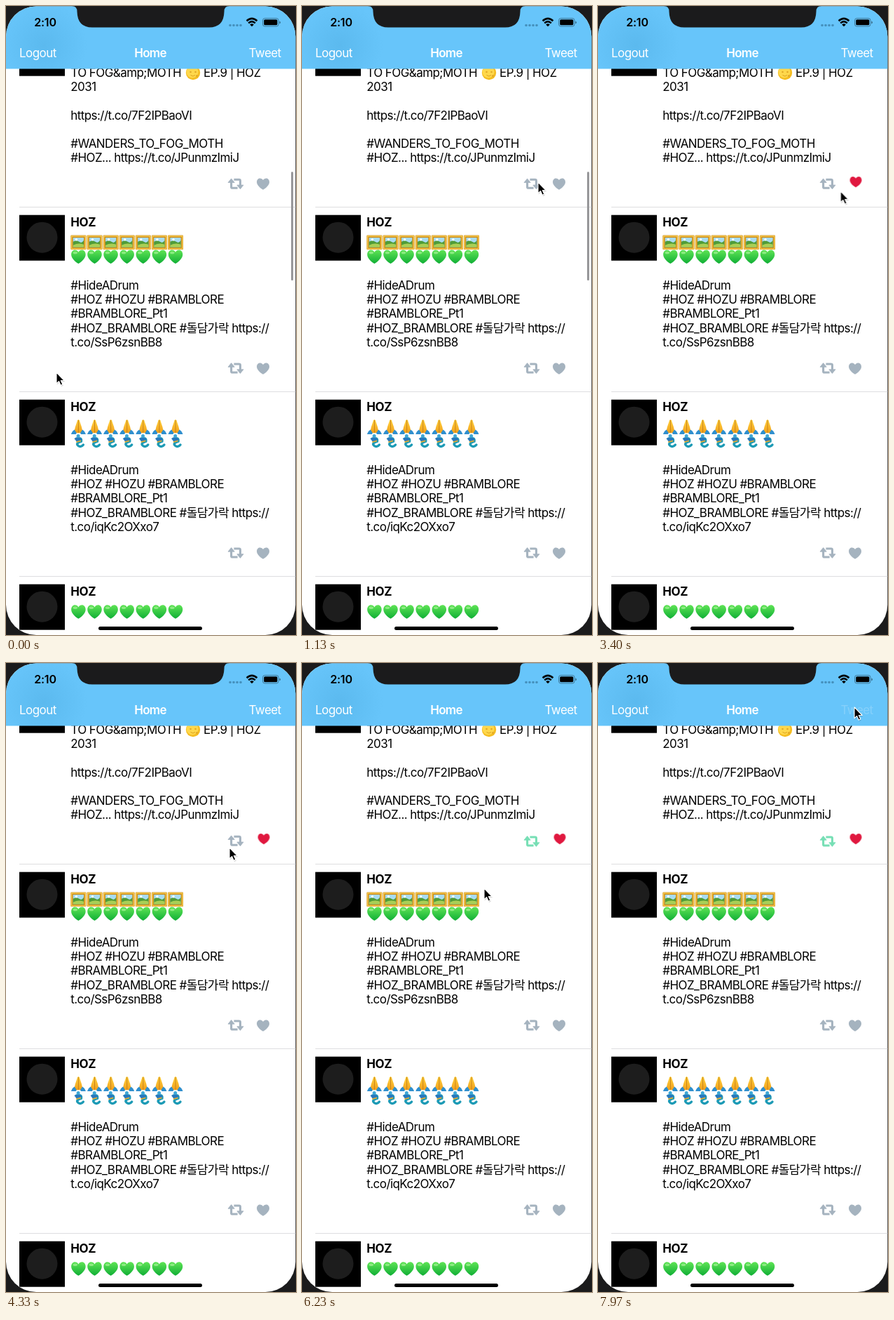
Write an HTML page that moves like this. It is 414 px wide and 896 px high and loops after 8000 ms.

```html
<!DOCTYPE html>
<html lang="en">
<head>
<meta charset="utf-8">
<title>Home feed</title>
<style>
  html, body { margin: 0; width: 100%; height: 100%; overflow: hidden; background: #1b1b1c; }
  svg { display: block; }
  text {
    font: 400 17px Inter, "Noto Sans CJK KR", "Noto Sans CJK", sans-serif;
    letter-spacing: -.57px;
    white-space: pre;
  }
  .name { font-weight: 700; letter-spacing: -.4px; }
  .title { font-weight: 600; letter-spacing: -.7px; }
  .clock { font-weight: 600; font-size: 16px; letter-spacing: -.2px; }
  .bar text { fill: #fff; }
  .bar .clock { fill: #000; }
</style>
</head>
<body>
<svg width="414" height="896" viewBox="0 0 414 896">
  <defs>
    <clipPath id="screen"><rect x="0" y=".5" width="413.3" height="895.5" rx="43"/></clipPath>
    <radialGradient id="shade" gradientUnits="userSpaceOnUse" cx="54" cy="56" r="62">
      <stop offset="0" stop-color="#3f9fd4" stop-opacity=".3"/>
      <stop offset="1" stop-color="#3f9fd4" stop-opacity="0"/>
    </radialGradient>
    <linearGradient id="leaf" x2="0" y2="1">
      <stop offset="0" stop-color="#5fe455"/><stop offset="1" stop-color="#0fae35"/>
    </linearGradient>
    <linearGradient id="skin" x2="0" y2="1">
      <stop offset="0" stop-color="#ffd23c"/><stop offset="1" stop-color="#f2a01d"/>
    </linearGradient>
    <path id="heart" d="M0 8.3C-4 6-9 2-9-2.6C-9-6-6.9-8-4.4-8C-2.5-8-.9-7 0-5.3C.9-7 2.5-8 4.4-8C6.9-8 9-6 9-2.6C9 2 4 6 0 8.3Z"/>
    <g id="half">
      <path d="M-6.4-3V4.4Q-6.4 6 -4.8 6H2.6" fill="none" stroke="currentColor" stroke-width="3.1"/>
      <path d="M-11-1.8L-6.4-7.4L-1.8-1.8Z" fill="currentColor" stroke="currentColor" stroke-width=".8" stroke-linejoin="round"/>
    </g>
    <g id="repeat"><use href="#half"/><use href="#half" transform="rotate(180)"/></g>
    <g id="love">
      <use href="#heart" fill="url(#leaf)" transform="scale(1.14 1.2)"/>
      <ellipse cx="-4.6" cy="-5.6" rx="3.2" ry="1.8" fill="#b4f7a4" opacity=".6"/>
    </g>
    <g id="frame">
      <rect x="-11" y="-10.2" width="22" height="20.4" rx="1" fill="#c98a1c"/>
      <rect x="-9.8" y="-9" width="19.6" height="18" fill="none" stroke="#f4c64a" stroke-width="1.6"/>
      <rect x="-7.6" y="-6.8" width="15.2" height="13.6" fill="#a8dcf2"/>
      <path d="M-7.6-1Q-3-4 1-1T7.6-3V6.8H-7.6Z" fill="#4f9c38"/>
      <path d="M-7.6 4Q0 0 7.6 3V6.8H-7.6Z" fill="#a9cf55"/>
      <circle cx="-3" cy="-4" r="1.7" fill="#fff"/>
    </g>
    <g id="hands">
      <path d="M-6.5 8.5L-4.4-.5L-1.4-9.6Q0-11.4 1.4-9.6L4.4-.5L6.5 8.5Z" fill="url(#skin)"/>
      <path d="M-10.5 10.3Q-9 5.5-5.6 3.6L-2.6 8.4L-3.6 10.3ZM10.5 10.3Q9 5.5 5.6 3.6L2.6 8.4L3.6 10.3Z" fill="#2f8fce"/>
      <path d="M0-10V8" stroke="#c27c17" stroke-width=".9"/>
    </g>
    <g id="spirit">
      <path d="M-3-4Q5-6 4 0Q-5 3 0 6.5Q4 9 7 5" fill="none" stroke="#1c9ab5" stroke-width="3.4" stroke-linecap="round"/>
      <path d="M-6-4L0-6L5-3L2 1L-3 0Z" fill="#2878bd"/>
      <circle cx="-.3" cy="-7.5" r="2.5" fill="#3da7d6"/>
      <path d="M-3.2 1L3.6-.7" stroke="#e0ad35" stroke-width="1.7"/>
    </g>
    <g id="moon">
      <circle r="10.2" fill="#f5bd22"/>
      <circle cx="-1" cy="-1" r="8.5" fill="#ffd84c"/>
      <g fill="#e3a926"><circle cx="-3.5" cy="-1" r="1.3"/><circle cx="3.5" cy="-1" r="1.3"/><circle cx="5.5" cy="4.5" r="1.6"/></g>
      <path d="M-3.5 3.5Q0 6.5 3 3.5" fill="none" stroke="#dba01f"/>
    </g>
  </defs>

  <g clip-path="url(#screen)">
    <rect width="414" height="896" fill="#fff"/>
    <g id="feed"></g>
    <rect id="scrollbar" x="407" y="236" width="3" height="155" rx="1.5" fill="#979799"/>

    <g class="bar">
      <rect width="414" height="89.5" fill="#67c5fa"/>
      <rect width="130" height="89" fill="url(#shade)"/>
      <text class="clock" x="56" y="29.4" text-anchor="middle">2:10</text>
      <text x="19" y="73">Logout</text>
      <text class="title" x="206" y="73" text-anchor="middle">Home</text>
      <text id="compose" x="392.6" y="73" text-anchor="end">Tweet</text>
      <g fill="#4591bd">
        <circle cx="320" cy="27.5" r="1.8"/><circle cx="325" cy="27.5" r="1.8"/>
        <circle cx="330" cy="27.5" r="1.8"/><circle cx="335" cy="27.5" r="1.8"/>
      </g>
      <path d="M343.6 21.3Q351 14.6 358.4 21.3M346.2 24.4Q351 20 355.8 24.4" fill="none" stroke="#000" stroke-width="2.6"/>
      <path d="M348.2 26.4Q351 24 353.8 26.4L351 29.3Z"/>
      <rect x="366.5" y="17.5" width="22.5" height="11.5" rx="3" fill="none" stroke="#000" stroke-opacity=".38"/>
      <rect x="368.2" y="19.2" width="19.1" height="8.1" rx="1.6"/>
      <path d="M390.3 21.5Q392 22 392 23.4T390.3 25.2Z" fill-opacity=".45"/>
    </g>
    <rect x="132" y="884" width="148" height="5" rx="2.5"/>
  </g>

  <path d="M94 0Q101.5 0 101.5 8Q102 30.5 123 30.5H290Q311 30.5 311.5 8Q311.5 0 319 0Z" fill="#1b1b1c"/>

  <g id="cursor">
    <path d="M.7 1.6V17.6L4.4 14.2L7 20L9.8 18.8L7.2 13.2H12.2Z" fill="#000" opacity=".16"/>
    <path d="M0 0V15.8L3.6 12.5L6.1 18.2L8.8 17L6.3 11.5H11.2Z" fill="#000" stroke="#fff" stroke-width="1.1" stroke-linejoin="round"/>
  </g>
</svg>

<script>
const LOOP = 8000, ROW = 263, LEADING = 20.28;
const GREY = '#a5b3bf', RED = '#e0183f', GREEN = '#77dfb5';

const line = (y, s) => `<text x="92.3" y="${y}">${s}</text>`;
const lines = (y, list) => list.map((s, i) => s && line(y + i * LEADING, s)).join('');
const emojiRow = (id, y) => Array.from({ length: 7 }, (_, i) =>
  `<use href="#${id}" x="${103.4 + i * 23.1}" y="${y}"/>`).join('');
const avatar = y => `<rect x="19" y="${y}" width="65" height="65"/>
  <circle cx="51.5" cy="${y + 32}" r="22" fill="#1d1d1d"/>`;
const repeat = (y, color) => `<use href="#repeat" x="328" y="${y}" color="${color}"/>`;
const heart = (x, y, color, size = 1) =>
  `<use href="#heart" transform="translate(${x} ${y}) scale(${size})" fill="${color}"/>`;
const icons = y => repeat(y, GREY) + heart(367, y + .4, GREY);
const rule = y => `<path d="M19 ${y}H414" stroke="#dedee0"/>`;

const post = (index, emojis, text = []) => {
  const y = 286.5 + index * ROW;
  return rule(y) + avatar(y + 11.2)
    + `<text class="name" x="92.3" y="${y + 27.7}">HOZ</text>`
    + emojis.map((id, i) => emojiRow(id, y + 50.3 + i * 20.3)).join('')
    + lines(y + 117.4, text)
    + (text.length ? icons(y + 229.5) : '');
};

const tags = path => ['#HideADrum', '#HOZ #HOZU #BRAMBLORE', '#BRAMBLORE_Pt1',
  '#HOZ_BRAMBLORE #돌담가락 https://', path];

document.getElementById('feed').innerHTML =
  avatar(34.7)
  + lines(100.7, ['TO FOG&amp;amp;MOTH', '2031', '', 'https://t.co/7F2IPBaoVI', '',
    '#WANDERS_TO_FOG_MOTH', '#HOZ... https://t.co/JPunmzImiJ'])
  + '<use href="#moon" x="267" y="95"/>'
  + '<text x="282" y="100.7">EP.9 | HOZ</text>'
  + `<g id="share">${repeat(253.3, GREY)}</g><g id="shared">${repeat(254, GREEN)}</g>`
  + `<g id="like">${heart(367, 253.4, GREY)}</g><g id="liked">${heart(368, 250.6, RED, .94)}</g>`
  + post(0, ['frame', 'love'], tags('t.co/SsP6zsnBB8'))
  + post(1, ['hands', 'spirit'], tags('t.co/iqKc2OXxo7'))
  + post(2, ['love']);

const play = (id, steps) =>
  document.getElementById(id).animate(steps, { duration: LOOP, iterations: Infinity });

// Opacity change from one value to another, hard unless a duration is given.
const fade = (id, before, after, at, duration = 0) => play(id, [
  { offset: 0, opacity: before },
  { offset: at / LOOP, opacity: before },
  { offset: (at + duration) / LOOP, opacity: after },
  { offset: 1, opacity: after }
]);

// time, x, y of the pointer tip
const path = [
  [0, 72, 522], [30, 72, 522], [700, 332, 250], [970, 332, 250], [1130, 337, 251],
  [1700, 361, 252], [1930, 361, 252], [2430, 363, 255], [2700, 363, 255],
  [3470, 346, 264], [3800, 346, 264], [4330, 319, 263], [4530, 323, 253],
  [4670, 323, 253], [4730, 324, 253], [5000, 324, 253], [5470, 262, 317],
  [6000, 262, 317], [6230, 260, 321], [6800, 261, 356], [7130, 261, 360],
  [7260, 262, 358], [7630, 369, 22], [7670, 369, 22], [7880, 366, 63], [8000, 366, 63]
];
play('cursor', path.map(([t, x, y]) => ({
  offset: t / LOOP, transform: `translate(${x}px, ${y}px)`, easing: 'ease-in-out'
})));

fade('scrollbar', 1, 0, 1400, 300);
fade('like', 1, 0, 2720);
fade('liked', 0, 1, 2720);
fade('share', 1, 0, 5000);
fade('shared', 0, 1, 5000);
fade('compose', 1, .2, 7930);
</script>
</body>
</html>
```
